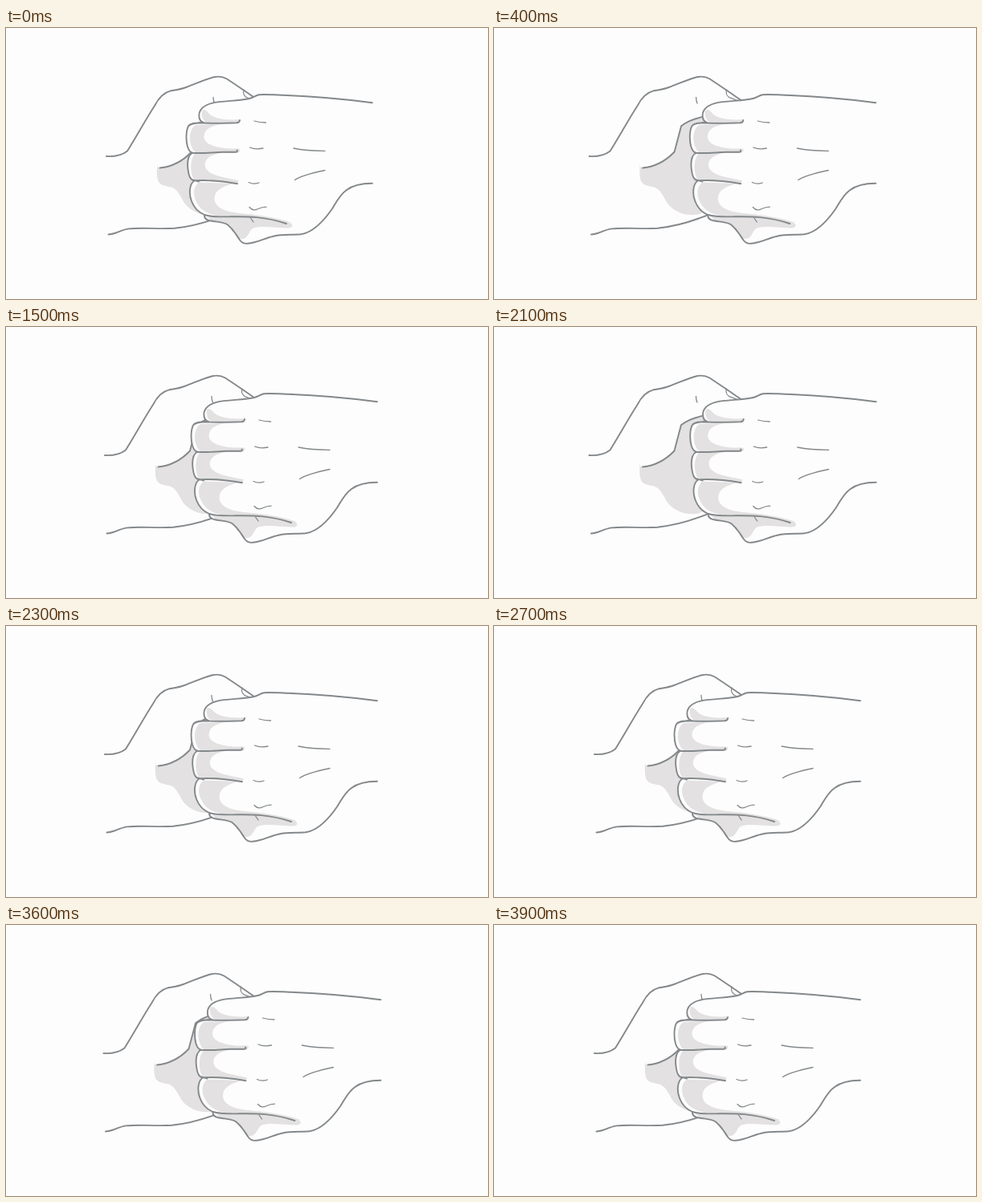
An HTML page that plays this animation: 600 px wide and 338 px high, repeating every 4100 ms.

```html
<!DOCTYPE html>
<html lang="en">
<head>
<meta charset="utf-8">
<title>Rubbing hands</title>
<style>
  html, body { margin: 0; width: 100%; height: 100%; overflow: hidden; background: #fdfdfd; }
  svg { display: block; width: 600px; height: 338px; }
  .line { fill: none; stroke: #84888b; stroke-width: 1.9; stroke-linecap: round; stroke-linejoin: round; }
  .fine { stroke-width: 1.3; }
  .skin { fill: #fdfdfd; }
  .shade { fill: #e3e1e1; }
</style>
</head>
<body>
<svg viewBox="0 0 600 338">
  <defs>
    <path id="fist" d="M456 93.2 C425 89 385 85.3 345 83.7 C332 83.2 321 82.6 315 83.2 C310.5 84 308.500 86.800 303 88
      C290 91.300 269 90.500 256 93.800 C245 96.500 240.300 103 240.300 109 C240.300 114 242.500 117 246 118
      C238 118.500 230 118 227 122.500 C224 128 223.700 140 226 148 C227.500 152.500 229 155 232 155.700
      C226.500 159 225.500 168 226.500 176 C227.500 184 229 189.500 234.500 190.500
      C228 194.500 227.500 207 231 216 C234 224 240 230 247 233
      C246.500 237 248.500 239 254 240.300 C264 242.300 271 241.500 276 245.500 C284 252 287 259 291.500 265
      C294 268.500 297 269.200 301 268.800 C313 267.500 322 262 333 259.700 C346 256.800 355 258.500 367 257.300
      C382 255 396 240 406 225.500 C415 211 421 193.500 456 193.700"/>
  </defs>

  <g id="left">
    <path class="shade" d="M188 171 C189 175 191 176 198 173.500 C211 170 224 162 231 154.500 L239.500 122.300
      C246 117 256 112.500 269 110.400 L275 160 L266 230 C262 234 250 234 241 231.500 C232 228 226 224 221.500 217.500
      C217 209 213 201 206 198.500 C198 197 192.500 196 190 192 C187 185 188 178 188 171Z"/>
    <g class="line">
      <path d="M125 160 C134 160.500 144 159 151 153.500 C162 136 174 114 185 97 C190 87 196 80.500 205 78.300
        C212 77 217 76.800 224 74 C239 68.300 250 63.300 259 61.200 C265.500 59.800 270 60.500 275 63.500
        C284 69.500 296 77.500 308 86 L314 90"/>
      <path d="M127.500 257.500 C136 257.300 142 252 153 250.400 C172 248.300 188 251.300 210 249.700
        C237 247 258 239.500 277 231.300"/>
      <path d="M191.500 174.500 C207 173 221 165 231 154.500 L239.500 122.300 C246 117 256 112.500 269 110.400"/>
      <path class="fine" d="M296 77 C294.500 82 297 86 302 87.700 L311 91 M258 86.500 Q258 91 259.500 94"/>
    </g>
  </g>

  <g id="right">
    <use href="#fist" class="skin"/>
    <g class="shade">
      <path d="M244 103 C243 108 244 114 249 117.500 L287 117.500 L291 114 C280 115 260 114.500 253 107 Q247 100 244 103Z"/>
      <path d="M236 121 C229 125 227 138 231 148 Q232 152 236 155 L287 156 C293 155 293 149 286 150.500
        C270 151 249 148 246.500 137 C246 126 255 122 270 119.500Z"/>
      <path d="M235 157 C229 164 229 178 233 187 L237 190.500 L288 193.500 L290 190.500
        C277 187 251 185 248 173 C246.500 165 252 159 266 156Z"/>
      <path d="M240 192.500 C231 200 233 212 240 222 C246 230 258 235 275 235.500 L349 244 L356 243
        C333 235 310 233 290 231 C273 229 260.500 224 259.500 214 C259 203 268 198 283 194Z"/>
      <path d="M250 234 L300 236 L349 242 C358 243 359 249 351 249.500 C336 249 315 246 307 250 C302 254 301 263 294 263
        Q288 263 287.500 258 C284 252 279 247 273 244 L255 240Z"/>
    </g>
    <g class="line">
      <use href="#fist"/>
      <path d="M240 118.300 C257 119.200 275 118.500 287 118.300 Q290.500 118 291 115"/>
      <path d="M231 155.700 C245 157 257 155 270 154.800 L285 154.800 Q289 154.500 287.500 152.500"/>
      <path d="M233 189.500 L240 191.500 M237 190.300 C252 189.300 272 191.500 288 194.200"/>
      <path d="M247 233 C257 236 268 235.500 280 235.300 C300 235 322 235 349 244"/>
      <g class="fine">
        <path d="M309 116 Q316 118 323.500 118 M303.500 149 Q311 152 320 150 M302 192.500 Q308 195.500 315 193"/>
        <path d="M303 223.500 C307 228 310 227.500 314 225.500 Q319 223.300 324 223.200 M304.500 237 L308 242"/>
        <path d="M358 150 Q374 153.200 397 153.400 M359.500 189.500 C365 185.500 378 181.500 397 177.500"/>
      </g>
    </g>
  </g>
</svg>
<script>
  const LOOP = 4100, STEP = 100, REACH = 21;
  // Rubbing strokes: [start, end] in ms, alternately out and back
  const strokes = [[0, 550], [550, 1150], [1250, 1850], [1950, 2550], [2650, 3250], [3300, 3900]];
  const left = document.getElementById('left');
  const right = document.getElementById('right');

  const ease = p => p < 0.5 ? 4 * p ** 3 : 1 - 4 * (1 - p) ** 3;
  const clamp = p => Math.min(1, Math.max(0, p));

  function offset(t) {
    return REACH * strokes.reduce((sum, [a, b], i) =>
      sum + (i % 2 ? -1 : 1) * ease(clamp((t - a) / (b - a))), 0);
  }

  function draw(now) {
    const t = Math.floor(now % LOOP / STEP) * STEP;
    const x = offset(t);
    right.setAttribute('transform', `translate(${x.toFixed(2)})`);
    left.setAttribute('transform', `translate(${(-x / 3).toFixed(2)})`);
  }

  let start;
  function tick(now) {
    start ??= now;
    draw(now - start);
    requestAnimationFrame(tick);
  }
  draw(0);
  requestAnimationFrame(tick);
</script>
</body>
</html>
```
